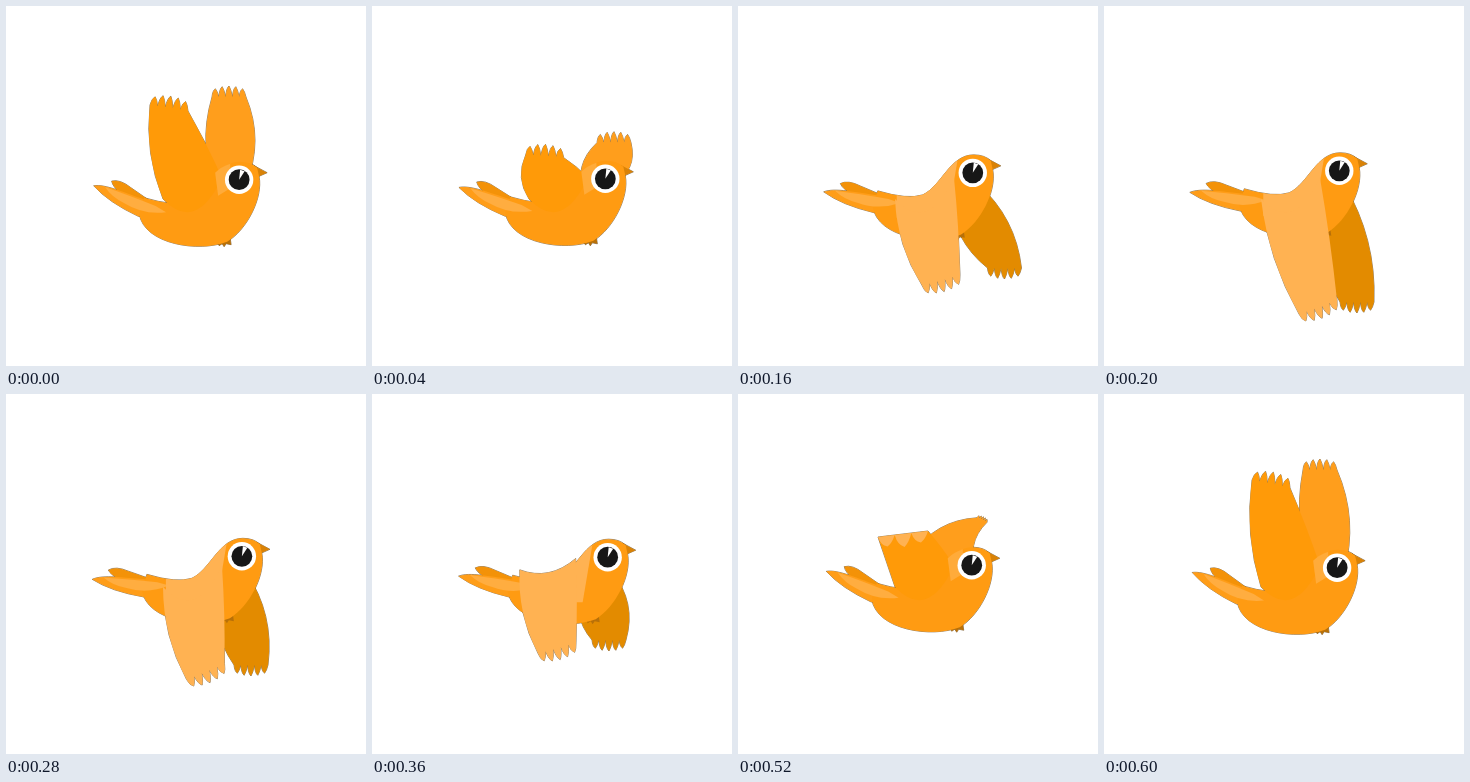
Write an HTML page with a canvas that moves like this. It is 360 px wide and 360 px high and loops after 0.64 s.

```html
<!DOCTYPE html>
<html>
<head>
<meta charset="utf-8">
<title>Flying bird</title>
<style>
html, body { margin: 0; width: 100%; height: 100%; overflow: hidden; background: #fff; }
canvas { display: block; }
</style>
</head>
<body>
<canvas id="stage" width="360" height="360"></canvas>
<script>
const ctx = document.getElementById('stage').getContext('2d');
const STEP = 40, STEPS = 16;
const ORANGE = '#ff9b12', LIGHT = '#ffb252', DARK = '#e38b00';

// Path of each wing tip, with the steps at which its points are reached.
const beats = [0, 3, 5, 9, 11, 13, 15];
const nearPath = [[163, 102], [192, 247], [214, 301], [185, 254], [163, 209], [165, 140], [167, 90]];
const farPath = [[223, 91], [280, 228], [253, 296], [237, 246], [249, 152], [244, 126], [216, 76]];

// Body parts, relative to the eye.
const bodyShape = new Path2D('M-95 18Q-65 27 -50 22C-31 13 -23 -18 1 -18Q12 -18 18 -12L20 -3C24 18 8 50 -12 62C-40 73 -95 65 -100 34Z');
const saddle = new Path2D('M-76 0L-40 -30L-14 -20L-25 45L-76 45Z');
const beak = new Path2D('M15 -14L28 -7L19 -3Z');
const feet = new Path2D('M-22 61L-9 58L-8 65L-13 64L-15 67L-17 64L-20 66Z');
const cheek = new Path2D('M-24 -7Q-18 -13 -9 -16L-8 8L-21 16Z');
const glint = new Path2D('M0 0L1 -10L5.5 -8.5Z');

// Tail parts, relative to the tail root and pointing left.
const tailTop = new Path2D('M-50 -11Q-43 -16 -30 -12L0 -5L-20 -3L-37 -3Q-47 -6 -50 -11Z');
const tailLow = new Path2D('M-65 0C-55 -6 -35 -5 0 -6L8 4L-12 12Q-45 10 -65 0Z');
const tailBand = new Path2D('M-54 -3Q-30 -4 0 -4L12 -2Q-8 9 -30 5Q-44 4 -54 -3Z');

const wave = t => Math.cos(2 * Math.PI * t / STEPS);
const add = (a, b, k = 1) => a.map((v, i) => v + b[i] * k);
const mix = (a, b, k) => a.map((v, i) => v + (b[i] - v) * k);

function bump(step, centre, width) {
  const d = Math.min(1, Math.abs(step - centre) / width);
  return Math.cos(d * Math.PI / 2) ** 2;
}

function along(path, step) {
  const i = beats.findLastIndex(b => b <= step);
  const end = beats[i + 1] || STEPS;
  return mix(path[i], path[(i + 1) % path.length], (step - beats[i]) / (end - beats[i]));
}

// Unit normal of a-b on the side away from a point.
function outward(a, b, from) {
  const dx = b[0] - a[0], dy = b[1] - a[1], len = Math.hypot(dx, dy);
  const n = [-dy / len, dx / len], m = mix(a, b, .5);
  const side = (m[0] - from[0]) * n[0] + (m[1] - from[1]) * n[1];
  return side < 0 ? [-n[0], -n[1]] : n;
}

function curveThrough(p, a, m, b) {
  p.quadraticCurveTo(...add(mix(a, b, .5), add(m, mix(a, b, .5), -1), 2), ...b);
}

function feathers(p, a, b, from, length, count) {
  const n = outward(a, b, from);
  const at = (s, out) => add(mix(a, b, s), n, out);
  for (let i = 0; i < count; i++) {
    const s = (i + .5) / count, peak = length * (.6 + 1.6 * s * (1 - s));
    p.quadraticCurveTo(...at((i + .1) / count, peak * .8), ...at(s, peak));
    p.quadraticCurveTo(...at((i + .8) / count, peak * .7), ...at((i + 1) / count, 0));
  }
}

function wing({ back, front, root, tip, half, backBow, frontBow, length }) {
  const a = add(tip, half, -1), b = add(tip, half);
  const centre = mix(mix(a, b, .5), mix(back, front, .5), .5);
  const p = new Path2D();
  p.moveTo(...back);
  curveThrough(p, back, add(mix(back, a, .5), outward(back, a, centre), backBow), a);
  feathers(p, a, b, centre, length, 5);
  curveThrough(p, b, add(mix(b, front, .5), outward(b, front, centre), frontBow), front);
  curveThrough(p, front, root, back);
  return p;
}

// Lit underside folded over the top edge.
function foldedEdge({ tip, half, root }) {
  const a = add(tip, half, -1), p = new Path2D();
  p.moveTo(...a);
  feathers(p, a, add(tip, half), root, -13, 3);
  p.closePath();
  return p;
}

function placed(shape, matrix) {
  const p = new Path2D();
  p.addPath(shape, matrix);
  return p;
}

function disc(x, y, r) {
  const p = new Path2D();
  p.arc(x, y, r, 0, 7);
  return p;
}

function fill(p, color) {
  ctx.fillStyle = color;
  ctx.fill(p);
}

function draw(step) {
  const bob = wave(step + .5), swing = wave(step + 1.5);
  const x = 234.5 - 1.4 * bob, y = 168 + 5.8 * bob;
  const at = new DOMMatrix().translate(x, y);
  const tailAt = at.translate(-85, 30).rotate(14.5 + 8.5 * swing);

  const lit = step > 1 && step < 12, down = step > 1 && step < 10;
  const lift = bump(step, 10.4, 2.6), curl = bump(step, 13, 1.6), narrow = bump(step, 12, 3);
  const near = {
    back: add([157, 193], [-21, -39], lift),
    front: add([216, 172], [-28, -17], lift),
    root: add([188, 205], [-26, -60], lift),
    tip: along(nearPath, step),
    half: [19 + 6 * curl, 6 * swing - 2 - 6 * curl],
    backBow: 6 - 6 * curl, frontBow: 1, length: 12 * (1 - curl)
  };
  const far = {
    back: add([212, 190], [-50, -40], narrow),
    front: [240, 178],
    root: [205, 205],
    tip: along(farPath, step),
    half: [17 - 16 * narrow, 3 * narrow],
    backBow: 9, frontBow: 9 - 24 * narrow, length: 11 - 10 * narrow
  };

  const bodyPath = placed(bodyShape, at), nearPart = [wing(near), lit ? LIGHT : '#ff9a08'];
  const parts = [
    [wing(far), down ? DARK : '#ff9e1c'],
    [placed(feet, at), '#b87008'],
    [placed(tailTop, tailAt), '#f39208'],
    [placed(tailLow, tailAt), '#ff9d18'],
    [placed(beak, at), '#d98206'],
    [bodyPath, ORANGE]
  ];

  ctx.fillStyle = '#fff';
  ctx.fillRect(0, 0, 360, 360);
  ctx.strokeStyle = 'rgba(80, 52, 12, .6)';
  ctx.lineJoin = 'round';
  [...parts, nearPart].forEach(([p]) => ctx.stroke(p));
  parts.forEach(part => fill(...part));
  fill(placed(tailBand, tailAt), '#ffad40');
  if (down) {
    ctx.save();
    ctx.clip(bodyPath);
    fill(placed(saddle, at), LIGHT);
    ctx.restore();
  }
  fill(...nearPart);
  if (curl > .7) fill(foldedEdge(near), LIGHT);
  if (!down) fill(placed(cheek, at), '#ffab3a');

  fill(disc(x, y, 14.2), '#fff');
  fill(disc(x, y, 10.4), '#171717');
  fill(placed(glint, at), '#fff');
}

const start = performance.now();
function tick() {
  draw(Math.floor((performance.now() - start) / STEP) % STEPS);
  requestAnimationFrame(tick);
}
tick();
</script>
</body>
</html>
```
